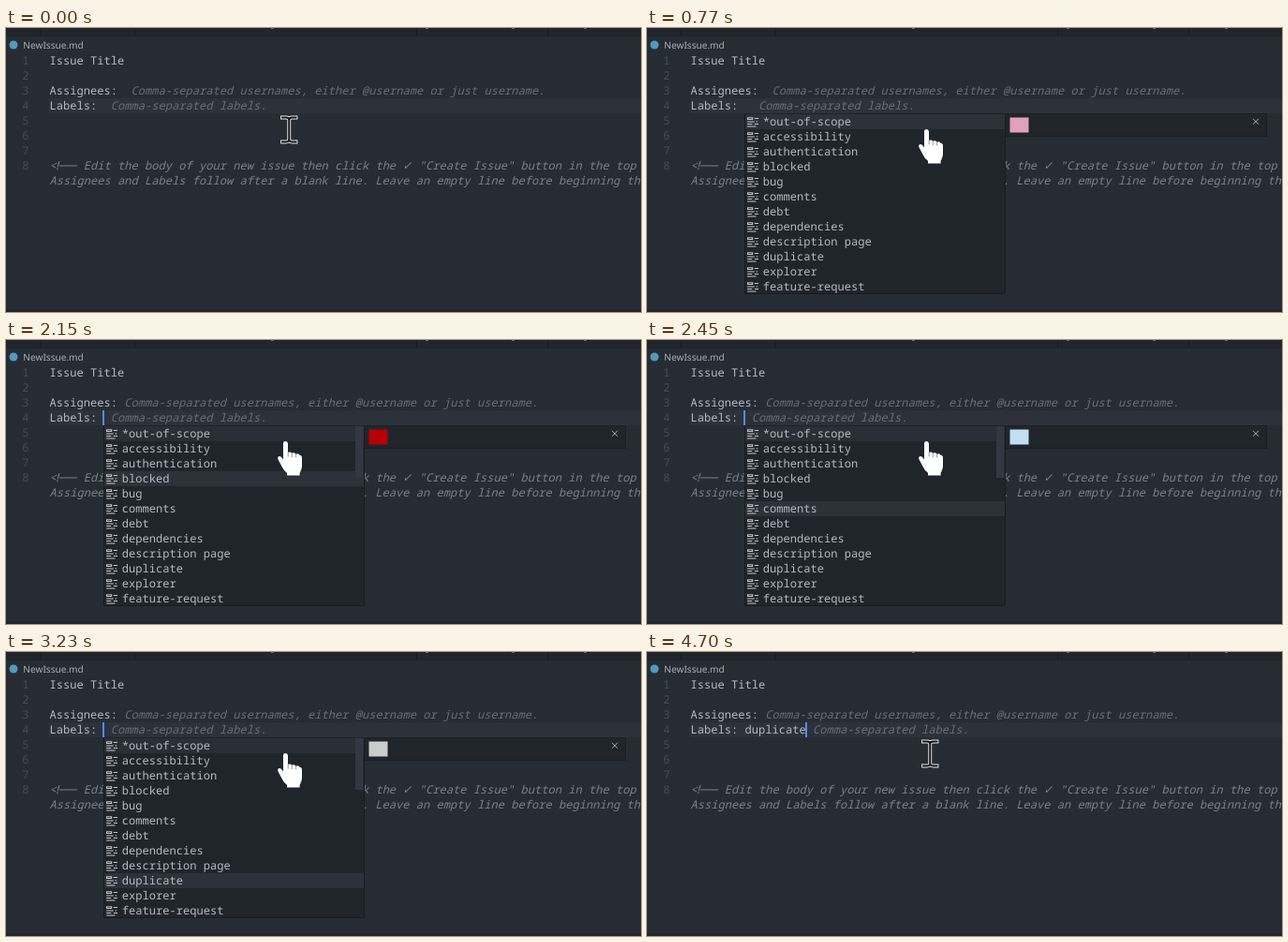
Animation, 678 px wide and 303 px high, one loop 5.2 s. Source, as an HTML page:

```html
<!DOCTYPE html>
<html lang="en">
<head>
<meta charset="utf-8">
<title>Label completion</title>
<style>
  html, body { margin: 0; width: 100%; height: 100%; overflow: hidden; background: #262c34; }
  svg { display: block; width: 678px; height: 303px; }
  text { font: 500 12.09px "Noto Sans Mono", "DejaVu Sans Mono", monospace; fill: #b4bac3; white-space: pre; text-rendering: geometricPrecision; }
  .num { font-weight: 400; fill: #454c58; text-anchor: end; }
  .comment, .hint { font-style: italic; fill: #7a808a; }
  .hint { fill: #696e76; }
  .file { font: 500 10.1px "Noto Sans", "Open Sans", sans-serif; fill: #a9b0ba; }
  .icon { fill: none; stroke: #c3c7cd; stroke-width: 1.25; }
</style>
</head>
<body>
<svg id="stage" viewBox="0 0 678 303"></svg>
<script>
const LOOP = 5200, CELL = 7.254, LEFT = 46.5, ROW = 16;
const stage = document.getElementById('stage');

function add(tag, attrs, parent = stage, content) {
  const el = document.createElementNS('http://www.w3.org/2000/svg', tag);
  for (const key in attrs) el.setAttribute(key, attrs[key]);
  if (content !== undefined) el.textContent = content;
  return parent.appendChild(el);
}
const rect = (x, y, width, height, fill, parent) => add('rect', { x, y, width, height, fill }, parent);
const text = (x, y, str, cls = '', parent) => add('text', { x, y, class: cls }, parent, str);
const col = n => LEFT + n * CELL;
const base = line => 23 + line * ROW;
const show = (el, on) => el.setAttribute('visibility', on ? 'visible' : 'hidden');

// Window edges and file name
rect(0, 0, 678, 303, '#262c34');
rect(0, 0, 678, 9, '#21262d');
for (const x of [36, 137, 438, 578]) rect(x, 0, 1, 9, '#191d22');
for (const x of [283, 448, 540, 617]) rect(x, 0, 3, 1, '#656c76');
rect(0, 300, 678, 3, '#20252c');
add('circle', { cx: 8, cy: 18, r: 4.5, fill: '#519aba' });
text(18.3, 22, 'NewIssue.md', 'file');

// Editor
rect(46, 75, 632, 16, '#2c313a');
for (let n = 1; n <= 8; n++) text(24.4, base(n), n, 'num');
text(LEFT, base(1), 'Issue Title');
text(LEFT, base(3), 'Assignees:');
const userHint = text(0, base(3), 'Comma-separated usernames, either @username or just username.', 'hint');
const labels = text(LEFT, base(4), 'Labels:');
const labelHint = text(0, base(4), 'Comma-separated labels.', 'hint');
text(LEFT, base(8), '<', 'comment');
text(LEFT + 4.5, base(8), '!', 'comment');
rect(57, 146.5, 19, 1, '#7a808a');
text(col(5), base(8), 'Edit the body of your new issue then click the ✓ "Create Issue" button in the top', 'comment');
text(LEFT, base(9), 'Assignees and Labels follow after a blank line. Leave an empty line before beginning the', 'comment');
const caret = rect(0, 75, 2, 16, '#528bff');

// Suggestion list with its detail panel
const items = [
  ['*out-of-scope', '#e0a0c0'], ['accessibility', '#e99695'], ['authentication', '#c2dff2'],
  ['blocked', '#b60205'], ['bug', '#ee4035'], ['comments', '#c2dff2'],
  ['debt', '#fbca04'], ['dependencies', '#0366d6'], ['description page', '#c2dff2'],
  ['duplicate', '#cccccc'], ['explorer', '#c2dff2'], ['feature-request', '#84b6eb']
];
const popup = add('g', {});
rect(383, 91, 279, 25, '#1b2025', popup);
rect(383, 92, 278, 23, '#20252b', popup);
const swatch = rect(387.5, 95.5, 20, 16, '#fff', popup);
add('path', { d: 'M647 96.8l6 6m0-6l-6 6', stroke: '#a4aab3', 'stroke-width': 1 }, popup);
rect(104, 91.5, 279, 192.5, '#181c21', popup);
rect(105, 92, 277, 191, '#20252b', popup);
rect(105, 92, 277, 16, '#2a2f37', popup); // row under the pointer
const pick = rect(105, 92, 277, 16, '#2c313a', popup);
const scroll = rect(373, 92, 8.5, 55, '#323842', popup);
items.forEach(([name], i) => {
  const y = 92 + i * ROW;
  add('path', {
    class: 'icon',
    transform: `translate(106.3 ${y + 1.6}) scale(.85)`,
    d: 'M1.5 2.5h6v2h-6zM10 3.5h5M1 7.5h9m2 0h2M1 10.5h6m3 0h5M1 13.5h11'
  }, popup);
  text(123.7, y + 12, name, '', popup);
});

// Mouse pointers
const beam = add('g', { fill: 'none', 'stroke-linecap': 'square' });
const beamPath = 'M295 95.5h4q3.200 0 3.200 2.500v21q0 2.500-3.200 2.500h-4M309.500 95.500h-4q-3.200 0-3.200 2.500v21q0 2.500 3.200 2.500h4';
add('path', { d: beamPath, stroke: '#e8eaec', 'stroke-width': 3.8 }, beam);
add('path', { d: beamPath, stroke: '#111418', 'stroke-width': 1.9 }, beam);
const hand = add('g', {});
add('path', {
  fill: '#fff',
  d: 'M296 110.500q0-2.600 2.400-2.600t2.600 2.600v9.500q2.300-1.300 4.200.8 2.300-1.200 4.300.9 2.300-1 4 1 2.500.2 2.500 3.200v8q0 3.500-1.500 6l-.9 2.100v2.500h-13.600v-2.700q-3.500-2.300-5.300-6.600l-4.200-7.600q-1.200-2.400.6-3.400 2-.8 3.600 1.500l1.300 1.800z'
}, hand);
add('path', { d: 'M301.200 120v4.500m4.100-3.500v4m4.300-3v3.500', stroke: '#767b82', 'stroke-width': .8 }, hand);

// Each step holds from its time until the next one changes the same key
const steps = [
  [0, { caret: 0, typed: '', gap: 2, list: 0, bar: 0, item: 0 }],
  [90, { caret: 1 }],
  [190, { typed: ' ' }],
  [680, { caret: 0 }],
  [770, { list: 1 }],
  [870, { bar: 1 }],
  [1170, { caret: 1, gap: 1 }],
  [1660, { caret: 0 }],
  [1760, { item: 1 }],
  [1950, { item: 2 }],
  [2150, { item: 3, caret: 1 }],
  [2350, { item: 4 }],
  [2450, { item: 5 }],
  [2640, { item: 6, caret: 0 }],
  [2840, { item: 7 }],
  [3030, { item: 8 }],
  [3130, { caret: 1 }],
  [3230, { item: 9 }],
  [3620, { caret: 0 }],
  [3820, { item: 10 }],
  [4110, { caret: 1 }],
  [4310, { item: 9 }],
  [4610, { caret: 0 }],
  [4700, { caret: 1, list: 0, typed: ' duplicate' }]
];

function draw(time) {
  const s = Object.assign({}, ...steps.filter(([at]) => at <= time).map(([, change]) => change));
  const line = 'Labels:' + s.typed;
  labels.textContent = line;
  labelHint.setAttribute('x', col(line.length + s.gap));
  userHint.setAttribute('x', col(10 + s.gap));
  caret.setAttribute('x', Math.round(col(line.length) - 1.2));
  show(caret, s.caret);
  show(popup, s.list);
  show(hand, s.list);
  show(beam, !s.list);
  show(scroll, s.list && s.bar);
  pick.setAttribute('y', 92 + s.item * ROW);
  swatch.setAttribute('fill', items[s.item][1]);
}

const start = performance.now();
function tick() {
  draw((performance.now() - start) % LOOP);
  requestAnimationFrame(tick);
}
tick();
</script>
</body>
</html>
```
